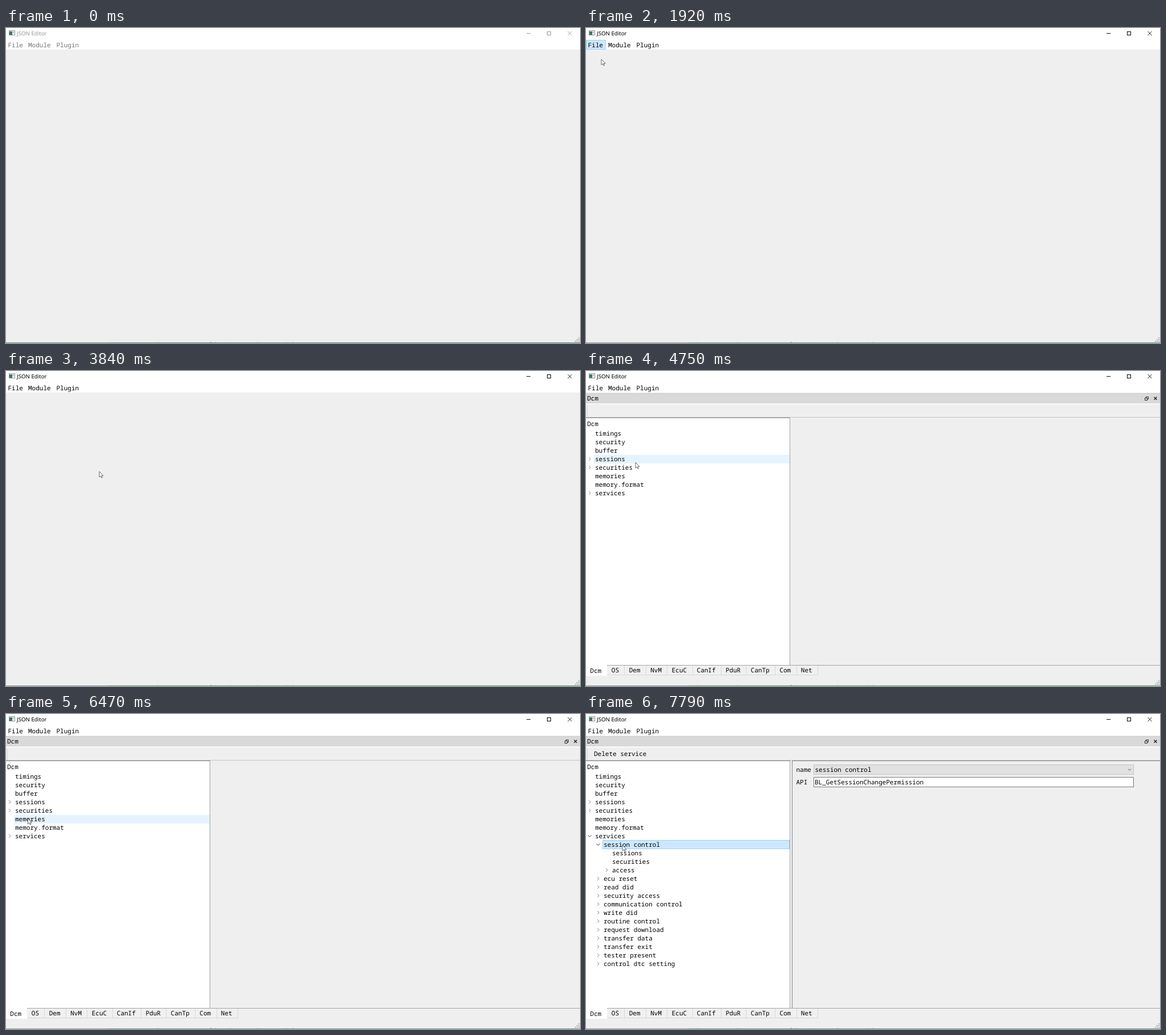
These frames come from a looping animation (1009 by 555 pixels, 7990 ms). An HTML page:

```html
<!DOCTYPE html>
<html lang="zh">
<head>
<meta charset="utf-8">
<title>JSON Editor</title>
<style>
  html, body { margin: 0; width: 100%; height: 100%; overflow: hidden; background: #efefef; }
  svg { display: block; width: 100vw; height: 100vh; }
  rect { shape-rendering: crispEdges; }
  text { white-space: pre; text-rendering: geometricPrecision; }
  .mono { font: 11px "Noto Sans Mono", "DejaVu Sans Mono", monospace; }
  .ui { font-family: "Noto Sans", "Noto Sans CJK SC", "Noto Sans CJK", sans-serif; }
</style>
</head>
<body>
<svg id="stage" viewBox="0 0 1009 555" xmlns="http://www.w3.org/2000/svg">
  <g id="view"></g>
  <path id="cursor" d="M0 0V10L2.4 7.9L4 11.3L5.5 10.6L4 7.4H7Z" fill="#fff" stroke="#444" stroke-width=".8"/>
</svg>
<script>
const LOOP = 7990, TICK = 101.4;
const view = document.getElementById('view');
const cursor = document.getElementById('cursor');

// Drawing helpers; text is placed by the vertical centre of its capitals.
const rect = (x, y, w, h, fill, extra = '') =>
  `<rect x="${x}" y="${y}" width="${w}" height="${h}" fill="${fill}" ${extra}/>`;
const box = (x, y, w, h, fill, stroke) =>
  rect(x + .5, y + .5, w - 1, h - 1, fill, `stroke="${stroke}"`);
const path = (d, color = '#333', width = 1) =>
  `<path d="${d}" fill="none" stroke="${color}" stroke-width="${width}"/>`;
const shape = (d, fill) => `<path d="${d}" fill="${fill}"/>`;
const mono = (x, cy, s, fill = '#000', anchor = 'start') =>
  `<text class="mono" x="${x}" y="${cy + 4}" fill="${fill}" text-anchor="${anchor}">${s}</text>`;
const ui = (x, cy, s, fill = '#111', size = 9.4, anchor = 'start') =>
  `<text class="ui" x="${x}" y="${cy + 3.4}" fill="${fill}" font-size="${size}" text-anchor="${anchor}">${s}</text>`;
const chevron = (x, y, dir, color = '#555', r = 3) => path({
  right: `M${x - r / 2} ${y - r}l${r} ${r}l${-r} ${r}`,
  left: `M${x + r / 2} ${y - r}l${-r} ${r}l${r} ${r}`,
  down: `M${x - r} ${y - r / 2}l${r} ${r}l${r} ${-r}`,
  up: `M${x - r} ${y + r / 2}l${r} ${-r}l${r} ${r}`
}[dir], color);
const cross = (x, y, r, color, width) =>
  path(`M${x - r} ${y - r}l${2 * r} ${2 * r}m0 ${-2 * r}l${-2 * r} ${2 * r}`, color, width);
const triangle = (x, y) => shape(`M${x - 2.5} ${y - 1.5}h5l-2.5 3z`, '#222');
const folder = (x, cy) =>
  rect(x, cy - 5, 6, 10, '#f5ce62') + rect(x + 5, cy - 3, 3, 8, '#ffe59a');
const grip = (x, y) => [0, 1, 2].map(r => [...Array(r + 1)].map((_, i) =>
  rect(x - 3 * i, y - 6 + 3 * r, 1.6, 1.6, '#b0b0b0')).join('')).join('');
const appIcon = (x, y) =>
  box(x, y, 11, 9, '#f4f4f4', '#909a98') + rect(x + 1, y + 2, 5, 6, '#3f7767') +
  rect(x + 7, y + 2, 2, 3, '#b5bdbb');

function mainWindow(active, menuOpen) {
  const ink = active ? '#000' : '#999', menuInk = active ? '#000' : '#777';
  return rect(0, 0, 1009, 555, '#efefef') + rect(0, 0, 1009, 38, '#fff') +
    appIcon(5, 4) + ui(19, 9.4, 'JSON Editor', ink, 9.7) +
    path('M915 9.5h7', ink) + box(951, 6, 7, 7, 'none', ink) + cross(991, 9.5, 3.5, ink, .9) +
    (menuOpen ? box(0, 21, 35, 17, '#cce8ff', '#99d1ff') : '') +
    mono(3.5, 29.5, 'File', menuInk) + mono(39, 29.5, 'Module', menuInk) +
    mono(88.5, 29.5, 'Plugin', menuInk) + grip(1006, 551) +
    mono(193, 557.5, 'insert to change current list item and name with', '#555') +
    rect(0, 554, 178, 1, active ? '#8f9a95' : '#668f83') +
    rect(178, 554, 831, 1, active ? '#58a070' : '#52897a');
}

const SERVICES = ['session control', 'ecu reset', 'read did', 'security access',
  'communication control', 'write did', 'routine control', 'request download',
  'transfer data', 'transfer exit', 'tester present', 'control dtc setting'];
const APIS = { 0: 'BL_GetSessionChangePermission', 1: 'BL_GetEcuResetPermission',
  7: 'BL_ProcessRequestDownload', 9: 'BL_ProcessRequestTransferExit' };
const TABS = ['Dcm', 'OS', 'Dem', 'NvM', 'EcuC', 'CanIf', 'PduR', 'CanTp', 'Com', 'Net'];

// Rows are [label, depth, marker]
function treeRows(openServices, openSession) {
  const rows = [['timings', 0], ['security', 0], ['buffer', 0], ['sessions', 0, 'right'],
    ['securities', 0, 'right'], ['memories', 0], ['memory.format', 0],
    ['services', 0, openServices ? 'down' : 'right']];
  if (openServices) SERVICES.forEach((name, i) => {
    const open = openSession && i === 0;
    rows.push([name, 1, open ? 'down' : 'right']);
    if (open) rows.push(['sessions', 2], ['securities', 2], ['access', 2, 'right']);
  });
  return rows;
}

function tree(rows, width, hover, selected) {
  return rect(0, 83, width, 435, '#fff') + mono(2, 92.5, 'Dcm') +
    rows.map(([label, depth, marker], i) => {
      const y = 110 + 15 * i, x = 15 * (depth + 1);
      const back = i === selected ? box(x - 1, y - 8, width - x + 1, 16, '#cce8ff', '#99d1ff')
        : i === hover ? rect(x - 1, y - 7, width - x + 1, 15, '#e5f3ff') : '';
      return back + (marker ? chevron(x - 8.5, y, marker, marker === 'down' ? '#333' : '#888') : '') +
        mono(x + 1, y, label);
    }).join('') + rect(width, 82, 1, 436, '#a0a4a8') + rect(0, 82, width + 1, 1, '#82878f');
}

function table() {
  const pitch = 22.18;
  return rect(252, 83, 757, 435, '#fff') + rect(253, 369, 19, 149, '#efefef') +
    rect(252, 82, 757, 1, '#82878f') + rect(252, 82, 1, 436, '#82878f') +
    [272, 456, 708].map(x => rect(x, 83, 1, 19, '#e5e5e5')).join('') +
    mono(364.5, 92.5, 'name', '#000', 'middle') + mono(582.5, 92.5, 'API', '#000', 'middle') +
    SERVICES.map((name, i) => {
      const top = Math.round(102.4 + pitch * i), h = Math.round(102.4 + pitch * (i + 1)) - top;
      const cy = 113.5 + pitch * i;
      return rect(253, top + h - 1, 456, 1, '#dcdcdc') + rect(708, top, 1, h, '#dcdcdc') +
        mono(255.5, cy, i + 1) + box(272, top, 185, h, '#e1e1e1', '#adadad') +
        mono(275, cy, name) + chevron(449.5, cy, 'down', '#555', 2.5) +
        (APIS[i] ? box(457, top, 252, h, '#fff', '#6f6f6f') + mono(459, cy, APIS[i]) : '');
    }).join('');
}

function form() {
  return rect(362, 82, 647, 1, '#82878f') + rect(362, 82, 1, 436, '#82878f') +
    mono(369.5, 98, 'name') + box(400, 89, 563, 18, '#e1e1e1', '#c4c4c4') +
    mono(402.5, 98, SERVICES[0]) + chevron(955.5, 98, 'down', '#555', 2.5) +
    mono(369.5, 119.5, 'API') + box(400, 111, 563, 18, '#fff', '#7a7a7a') + mono(402, 119.5, APIS[0]);
}

function dock(t, hover) {
  const openServices = t >= 6970, showTable = openServices && t < 7390;
  const showForm = t >= 7690, openSession = t >= 7790;
  const selected = t >= 7390 ? 8 : t >= 6870 ? 7 : -1;
  const action = showTable ? 'Add service' : showForm ? 'Delete service' : '';
  let x = 0;
  const tabs = TABS.map((name, i) => {
    const w = name.length * 6.6 + 17.7, left = x;
    x += w;
    return (i ? rect(left, 519, w, 17, '#f0f0f0') + rect(left + w - 1, 519, 1, 17, '#d9d9d9') +
      rect(left, 535, w, 1, '#d9d9d9') : rect(0, 518, w - 1, 19, '#fff')) +
      mono(left + 7.3, i ? 527 : 527.5, name);
  }).join('');
  return rect(0, 39, 1009, 18, '#d9d9d9') + rect(0, 39, 1009, 1, '#cdcdcd') + mono(2, 48, 'Dcm') +
    box(984, 45, 5, 5, 'none', '#333') + box(982, 47, 5, 5, '#d9d9d9', '#333') +
    cross(1001, 48.3, 2.5, '#222', 1.3) +
    rect(0, 57, 1009, 2, '#f8f8f8') + rect(0, 81, 1009, 1, '#c4c4c4') +
    path('M2.5 61V80', '#bbb').replace('/>', ' stroke-dasharray="1 1"/>') +
    mono(14, 70, action) + rect(0, 518, 1009, 1, '#a4a4a4') +
    tree(treeRows(openServices, openSession), showTable ? 248 : 358, hover, selected) +
    (showTable ? table() : showForm ? form() : '') + tabs;
}

const SIDEBAR = [['桌面', 107], ['下载', 125], ['文档', 143], ['图片', 161],
  ['KELV Live Upd', 179], ['Com', 197], ['json.editor', 215], ['Temp', 233]];
const FILES = [['__pycache__', '2023/5/24 23:25'], ['config', '2023/5/26 9:30'],
  ['plugin', '2023/5/21 22:16'], ['jse.json', '2023/5/25 9:21'], ['schema.json', '2023/5/24 23:23']];

function sidebar() {
  const icons = [
    rect(29, 103, 11, 8, '#1a86d9'),
    shape('M32.5 120h4v5h3l-5 6l-5-6h3z', '#2f86d6'),
    box(30, 138, 9, 11, '#fff', '#7d8b99') + path('M32 141.5h5m-5 2h5m-5 2h5', '#4d93c8'),
    box(29, 157, 11, 8, '#dcebf5', '#7d8b99') + rect(30, 161, 6, 3, '#3a6f9d')];
  return rect(4, 272, 104, 18, '#d9d9d9') +
    SIDEBAR.map(([name, y], i) => (icons[i] || folder(30, y)) + ui(43, y, name) +
      (i < 4 ? path(`M99.5 ${y + 3}l2.5-2.5m-2-2l4 4m-2.5-4.5l3.5 3.5m-3-3l1.5-1.5l2.5 2.5l-1.5 1.5`, '#777', .9) : '')).join('') +
    '<circle cx="28" cy="257.5" r="4.5" fill="#1683d8"/>' + ui(37, 257.5, 'KVO云盘') +
    shape('M26 277l8 1v6l-8-1z', '#3293d8') + path('M28 285.5h6', '#777') + ui(37, 281.5, '此电脑') +
    shape('M23 303l7-3l3 3v4l-5 3l-5-3z', '#3b8ac4') + ui(37, 305.5, '网络') +
    rect(108, 98, 16, 218, '#fff') + rect(109, 98, 12, 218, '#f0f0f0') + rect(109, 127, 12, 143, '#cdcdcd') +
    chevron(115, 105, 'up') + chevron(115, 309, 'down');
}

function fileList(t) {
  const picked = t >= 3540, hovered = t >= 3340 ? 3 : t >= 2530 ? 4 : -1;
  const rows = FILES.map(([name, date], i) => {
    const y = 131 + 16.2 * i, isFile = i > 2;
    const icon = isFile
      ? box(140, Math.round(y) - 6, 9, 11, '#fff', '#8a8a8a') +
        path(`M143.5 ${y - 2}h-1v4h1m2-4h1v4h-1`, '#b9822d', .8)
      : folder(140, y);
    return (i === hovered ? rect(135, Math.round(y - 8), 339, 16, picked ? '#cce8ff' : '#e5f3ff') : '') +
      icon + ui(153, y, name) + ui(332.5, y, date, '#666', 9.5) +
      ui(440, y, isFile ? 'JSON 源文件' : '文件夹', '#666', 9.2);
  }).join('');
  return ui(137, 108, '名称', '#555', 9) + ui(332.5, 108, '修改日期', '#555', 9) +
    ui(440, 108, '类型', '#555', 9) + chevron(230, 100.5, 'up', '#777') +
    rect(328, 98, 1, 20, '#e5e5e5') + rect(435, 98, 1, 20, '#e5e5e5') + rows +
    rect(124, 303, 350, 12, '#f0f0f0') + rect(137, 303, 240, 12, '#cdcdcd') +
    chevron(130, 309, 'left') + chevron(467, 309, 'right');
}

function navigation() {
  return path('M23 59.5h-8m3-3l-3 3l3 3M37 59.5h8m-3-3l3 3l-3 3', '#cfcfcf') +
    chevron(60, 59.5, 'down', '#ccc', 2) + path('M75 64.5v-9m-3.5 3.5l3.5-3.5l3.5 3.5', '#444') +
    box(85, 47, 222, 24, '#fff', '#d9d9d9') + rect(281, 47, 1, 24, '#d9d9d9') + folder(88, 59) +
    ui(102, 58.5, '«') + ui(113, 59, 'tools', '#111', 9.8) + chevron(144, 58.5, 'right', '#555', 2) +
    ui(151.5, 59, 'json.editor', '#111', 9.6) + chevron(207.5, 58.5, 'right', '#555', 2) +
    chevron(269, 59.5, 'down') + path('M297.2 56.2a4.2 4.2 0 1 0 1 3.5M298 54v3h-3') +
    box(314, 47, 152, 24, '#fff', '#d9d9d9') +
    path('M326 63l3.3-3.3M334 57.5a2.8 2.8 0 1 1-5.6 0a2.8 2.8 0 1 1 5.6 0', '#5b8499') +
    ui(345, 59, '在 json.editor 中搜索', '#666', 9.3) +
    rect(4, 75, 470, 23, '#f5f6f7') + ui(17, 86.5, '组织', '#1e3250', 9.2) + triangle(41, 86.5) +
    ui(65, 86.5, '新建文件夹', '#1e3250', 9.2) +
    path('M382 83.5h3m-3 3h3m-3 3h3M387 83.5h6m-6 3h6m-6 3h6', '#777') + triangle(403.5, 86.5) +
    box(422, 82, 12, 9, '#fff', '#607080') + rect(429, 83, 4, 7, '#3a86c4') +
    '<circle cx="456" cy="86.5" r="6.2" fill="#0867b5"/>' + ui(456, 86.5, '?', '#fff', 9.5, 'middle');
}

function dialog(t) {
  const picked = t >= 3540;
  const opacity = t < 2320 ? .6 : 1;
  const tip = t < 2940 || t >= 3340 ? 0 : t < 3040 ? .4 : 1;
  return `<g opacity="${opacity}">` +
    rect(4, 21, 470, 355, '#fff', 'style="filter:drop-shadow(0 1px 4px #0008)"') +
    appIcon(10, 28) + ui(25, 32.7, 'Open JSON', '#000', 9.6) + cross(460, 33, 3.7, '#222', .9) +
    navigation() + sidebar() +
    `<svg x="0" y="0" width="474" height="376">${fileList(t)}</svg>` +
    rect(4, 315, 470, 61, '#f0f0f0') + ui(105, 333.5, '文件名(N):', '#111', 9.2) +
    box(152, 325, 158, 18, '#fff', '#0078d7') + (picked ? '' : rect(154, 327, 34, 13, '#0078d7')) +
    ui(154.5, 333.5, 'jse.json', picked ? '#111' : '#fff') + chevron(303.5, 333.5, 'down', '#555', 2.5) +
    box(319, 325, 141, 17, '#e1e1e1', '#adadad') + ui(321, 333.5, '*.json') +
    chevron(453, 333.5, 'down', '#555', 2.5) +
    rect(320, 348, 63, 17, '#e1e1e1', 'stroke="#0078d7" stroke-width="2"') +
    ui(351.5, 356.5, '打开(O)', '#111', 9.3, 'middle') +
    box(394, 347, 65, 19, '#e1e1e1', '#adadad') + ui(426.5, 356.5, '取消', '#111', 9.2, 'middle') +
    grip(470, 373) +
    (tip ? rect(166, 206, 120, 38, '#000', 'opacity=".22"') + box(164, 204, 120, 38, '#fff', '#bcbcbc') +
      `<g opacity="${tip}">` + ['类型: JSON 源文件', '大小: 33.3 KB', '修改日期: 2023/5/24 23:23']
        .map((s, i) => ui(167.5, 210.3 + 12 * i, s, '#666', 9.3)).join('') + '</g>' : '') + '</g>';
}

// Pointer path: time, x, y
const POINTER = [[375, 420, 550], [1110, 171, 540], [1220, 120, 390], [1320, 60, 160],
  [1420, 18, 29], [1520, 27, 55], [2220, 27, 55], [2530, 164, 192], [3240, 164, 192],
  [3340, 164, 177], [4450, 164, 177], [4650, 94, 160], [4720, 87, 161], [4800, 87, 161],
  [5150, 72, 440], [5250, 70, 508], [5450, 60, 532], [5650, 55, 420], [5850, 53, 170],
  [5930, 52, 132], [6010, 52, 132], [6060, 48, 152], [6250, 46, 156], [6670, 31, 212],
  [7020, 31, 212], [7360, 64, 231], [LOOP, 64, 231]];

function pointerAt(t) {
  const i = Math.max(1, POINTER.findIndex(p => p[0] > t));
  const [t0, x0, y0] = POINTER[i - 1], [t1, x1, y1] = POINTER[i];
  const k = (t - t0) / (t1 - t0);
  return [x0 + (x1 - x0) * k, y0 + (y1 - y0) * k];
}

let shown = '';
function draw(t) {
  const q = 375 + TICK * Math.floor((t - 375) / TICK);
  const [x, y] = pointerAt(Math.max(375, q));
  cursor.setAttribute('transform', `translate(${x.toFixed(1)} ${y.toFixed(1)})`);
  cursor.setAttribute('visibility', t < 390 ? 'hidden' : 'visible');

  const active = t >= 490 && t < 2030 || t >= 3840;
  const hover = t >= 4550 && y > 102 && y < 518 ? Math.floor((y - 102.5) / 15) : -1;
  const next = mainWindow(active, t >= 1420 && t < 2030) +
    (t >= 2220 && t < 3840 ? dialog(t) : '') + (t >= 4250 ? dock(t, hover) : '');
  if (next !== shown) view.innerHTML = shown = next;
}

const start = performance.now();
function frame() {
  draw((performance.now() - start) % LOOP);
  requestAnimationFrame(frame);
}
frame();
</script>
</body>
</html>
```
